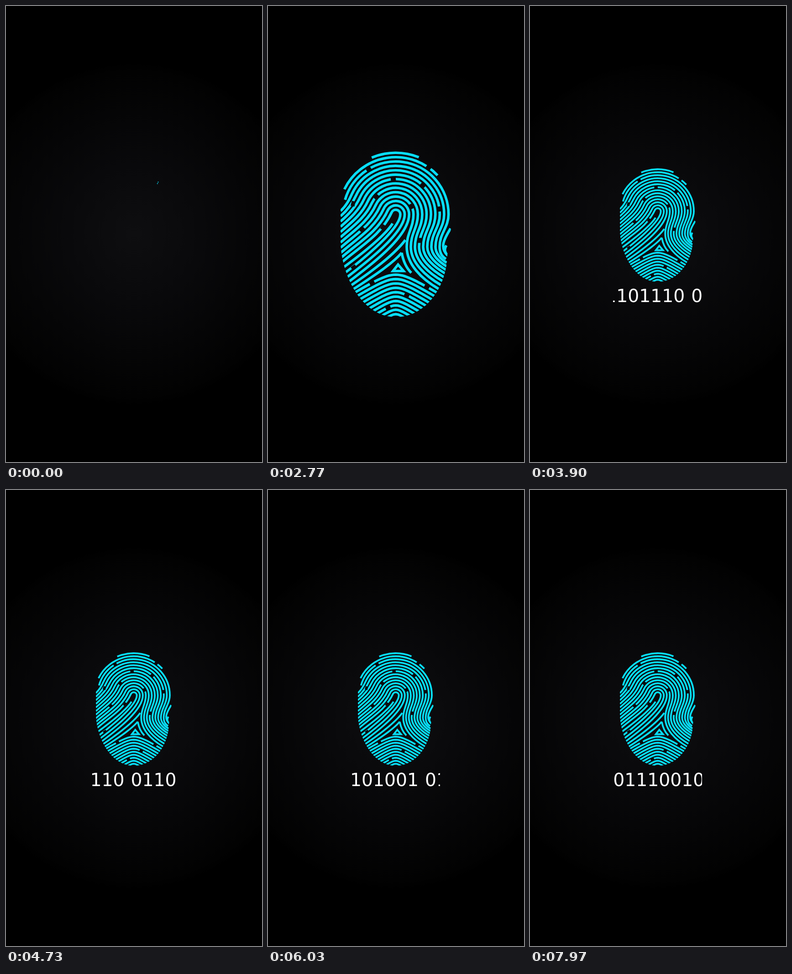
Recreate the animation shown at these times as an HTML page. Size 561 px wide and 998 px high, loop 8 s.

```html
<!DOCTYPE html>
<html lang="en">
<head>
<meta charset="utf-8">
<title>Fingerprint</title>
<style>
  html, body { margin: 0; width: 100%; height: 100%; overflow: hidden; background: #000; }
  svg { display: block; width: 100%; height: 100%; }
  #ridges { fill: none; stroke: #08def9; stroke-width: 5.6; }
  text { font: 39.3px "DejaVu Sans", Verdana, sans-serif; word-spacing: 1.35px; fill: #fff; }
</style>
</head>
<body>
<svg viewBox="0 0 561 998">
  <defs>
    <radialGradient id="glow" gradientUnits="userSpaceOnUse" cx="280" cy="499" r="375">
      <stop offset="0" stop-color="#0e0e10"/>
      <stop offset=".4" stop-color="#09090b"/>
      <stop offset=".95" stop-color="#020202"/>
      <stop offset="1" stop-color="#000"/>
    </radialGradient>
    <clipPath id="outline">
      <path d="M159 300V520C162 590 205 680 280 681C350 680 392 610 393 545L402 480V300Z"/>
    </clipPath>
    <mask id="cuts" maskUnits="userSpaceOnUse" x="0" y="0" width="561" height="998">
      <rect width="561" height="998" fill="#fff"/>
      <g id="gaps"></g>
    </mask>
    <clipPath id="window"><rect x="182" y="617" width="195" height="40"/></clipPath>
  </defs>
  <rect width="561" height="998" fill="url(#glow)"/>
  <g id="print">
    <g clip-path="url(#outline)"><g id="ridges" mask="url(#cuts)"></g></g>
  </g>
  <g clip-path="url(#window)"><text id="bits">01101110 01101001 01110010</text></g>
</svg>
<script>
const LOOP = 8000, PITCH = 9.6, CX = 280, CY = 456;
const $ = id => document.getElementById(id);
const radius = k => 10 + PITCH * (13 - k);
const polar = (k, deg) => {
  const a = deg * Math.PI / 180;
  return [CX + radius(k) * Math.cos(a), CY + radius(k) * Math.sin(a)];
};
const smooth = (t, from, to) => {
  const u = Math.min(1, Math.max(0, (t - from) / (to - from)));
  return u * u * (3 - 2 * u);
};

function add(parent, tag, attrs) {
  const el = document.createElementNS('http://www.w3.org/2000/svg', tag);
  for (const name in attrs) el.setAttribute(name, attrs[name]);
  return parent.appendChild(el);
}

const ridges = [];
function ridge(d) {
  const el = add($('ridges'), 'path', { d });
  const parts = Math.max(1, Math.round(el.getTotalLength() / 220));
  el.setAttribute('pathLength', parts);
  ridges.push({ el, flip: ridges.length % 2 === 0, delay: ridges.length * 7 % 5 * 50 });
}
const arcTo = (k, end) => `A${radius(k)} ${radius(k)} 0 0 1 ${end}`;
const arc = (k, from, to) => `M${polar(k, from)}${arcTo(k, polar(k, to))}`;

// Leg sweeping from the left edge up to the loop
function leftLeg(k) {
  const [x, y] = polar(k, 205), ex = 159, ey = 460 + 11.5 * (k - 4);
  const h = Math.hypot(x - ex, y - ey) * .35;
  return `M${ex} ${ey}C${ex + .75 * h} ${ey - .66 * h} ${x - .42 * h} ${y + .91 * h} ${x} ${y}`;
}

// S-shaped leg running to the lower right edge
function rightLeg(k) {
  const x = CX + radius(k), xm = 304 + 9 * (10 - k);
  const ex = 392 - .5 * (k - 4) ** 2, ey = 570 + 8.2 * (k - 4), h = 12 + 4 * (k - 2);
  return `C${x} 485 ${xm} 497 ${xm} 527` +
    `C${xm} ${537 + 3.5 * (k - 2)} ${ex - .87 * h} ${ey - .5 * h} ${ex} ${ey}`;
}

// Leg of an inner loop turning back to the left
function returnLeg(k) {
  const x = CX + radius(k), n = 13 - k;
  return `C${x} ${492 + 10 * n} ${185 + 5 * n} ${572 + 8 * n} ${166 + 4 * n} ${586 + 10 * n}`;
}

ridge(arc(0, 247, 292));
ridge(arc(1, 206, 317));
for (let k = 2; k <= 13; k++) {
  const start = k === 2 ? `M${polar(k, 196)}` : leftLeg(k);
  ridge(start + arcTo(k, polar(k, 360)) + (k > 10 ? returnLeg(k) : rightLeg(k)));
}

// Core line, then the ridges around the delta
ridge('M273 476C256 503 208 541 160 576');
ridge('M301 512C284 535 250 566 177 615');
ridge('M293 540C276 560 246 582 182 623');
ridge('M293 540Q298 568 314 584');
ridge('M285 566L274 580H297Z');
ridge('M400 487C388 507 374 528 394 546');
ridge('M391 524Q383 536 394 546');

// Arches at the bottom, more pointed towards the tip
function arch(x, j) {
  const bend = 20 - 1.6 * j;
  return 588 + PITCH * j - bend + Math.hypot(bend, .62 * (x - 280));
}
for (let j = 0; j < 10; j++) {
  const points = [];
  for (let x = 170; x <= 390; x += 5) {
    const y = arch(x, j);
    if (y < 684) points.push(`${x} ${y}`);
  }
  ridge('M' + points.join('L'));
}

function gap(x, y, angle) {
  add($('gaps'), 'rect', {
    x: -5.5, y: -4.2, width: 11, height: 8.4,
    transform: `translate(${x} ${y}) rotate(${angle})`
  });
}
[[1, 305], [2, 239], [4, 194], [4, 353], [5, 313], [6, 266], [8, 222], [10, 333]]
  .forEach(([k, deg]) => gap(...polar(k, deg), deg + 90));
[[206, 489, -47], [252, 484, -58], [332, 513, 90], [188, 572, -36]]
  .forEach(g => gap(...g));
[[228, 0, -28], [348, 0, 27], [304, 4, 24], [263, 7, -25]]
  .forEach(([x, j, angle]) => gap(x, arch(x, j), angle));

function draw(t) {
  for (const { el, flip, delay } of ridges) {
    const p = smooth(t, delay, 1950 + delay);
    el.style.display = p > 0 ? '' : 'none';
    el.style.strokeDasharray = p < 1 ? `${p} ${1 - p}` : 'none';
    el.style.strokeDashoffset = flip ? p - 1 : 0;
  }
  const scale = 1 - .315 * smooth(t, 2800, 3350);
  const lift = 20 * smooth(t, 3200, 3700);
  $('print').setAttribute('transform',
    `translate(279.5 ${499 - lift}) scale(${scale}) translate(-279.5 -499)`);

  const bits = $('bits');
  bits.style.display = t > 3280 ? '' : 'none';
  bits.setAttribute('x', 214.2 - 476 * smooth(t, 2300, 8680));
  bits.setAttribute('y', 647.6 - 32 * (1 - smooth(t, 3280, 3900)));
}

const begin = performance.now();
function tick(now) {
  draw(Math.max(0, now - begin) % LOOP);
  requestAnimationFrame(tick);
}
draw(0);
requestAnimationFrame(tick);
</script>
</body>
</html>
```
